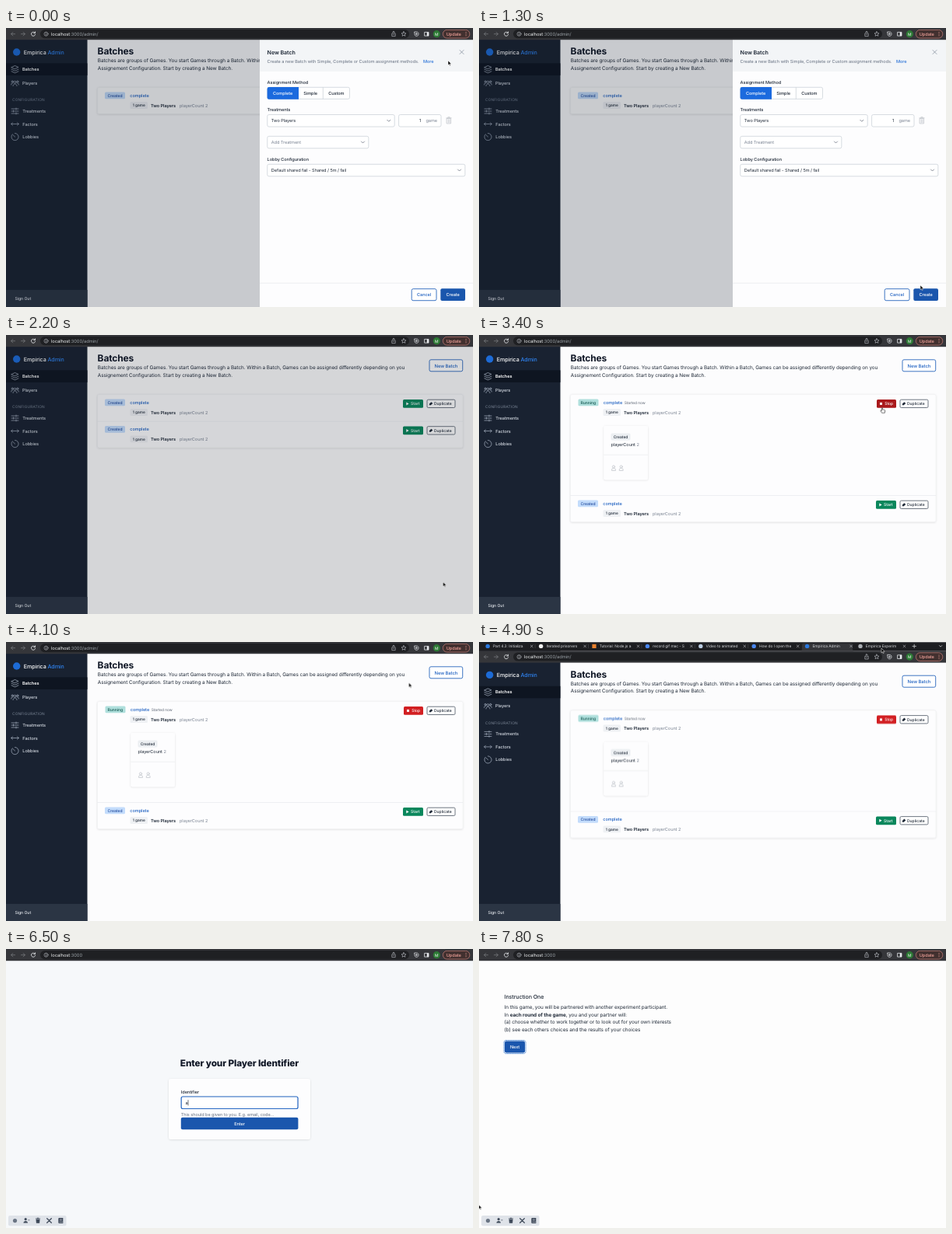
An HTML page that plays this animation: 600 by 359 pixels, repeating every 8 s.

```html
<!DOCTYPE html>
<html lang="en">
<head>
<meta charset="utf-8">
<title>Admin demo</title>
<style>
html, body { margin: 0; width: 100%; height: 100%; overflow: hidden; background: #fcfcfd; }
svg { display: block; width: 600px; height: 359px; }
text {
  font: 400 5.6px Inter, "Liberation Sans", sans-serif;
  letter-spacing: -.012em; text-rendering: geometricPrecision; fill: #1f2937; white-space: pre;
}
.m { font-weight: 500; }
.sb { font-weight: 600; }
.c { text-anchor: middle; }
.p { font-size: 6.4px; }
.p7 { font-size: 7.1px; }
.s { font-size: 5px; font-weight: 500; letter-spacing: 0; }
.tab { font-size: 4.9px; fill: #d5d7da; }
.w { fill: #fff; }
.g { fill: #7c8594; }
.bl { fill: #1c5fc0; }
.line { fill: none; stroke-width: .8; stroke-linecap: round; stroke-linejoin: round; }
.box { fill: #fff; stroke: #cdd3da; stroke-width: .8; }
.solid { fill: #1a56ad; }

/* one 8 s loop: 1.25 % = 100 ms */
.a { animation: 8s step-end infinite; }
.early { animation-name: early; }
.late { animation-name: late; }
.exp { animation-name: exp; }
.ins { animation-name: ins; }
.two { animation-name: two; }
.idle { animation-name: idle; }
.running { animation-name: running; }
.card { animation-name: card; }
.move { animation-name: move; }
.startHover { animation-name: startHover; }
.stopHover { animation-name: stopHover; }
.focus { animation-name: focus; }
.blank { animation-name: blank; }
.typed { animation-name: typed; }
.ring { animation-name: ring; }
.arrow { animation-name: arrow; }
.hand { animation-name: hand; }
.beam { animation-name: beam; }
.shift { animation: shift 8s ease-in-out infinite; }
.panel { animation: panel 8s cubic-bezier(.4,0,.2,1) infinite; }
.dim { animation: dim 8s linear infinite; }
.cursor { animation: cursor 8s ease-in-out infinite; }

@keyframes early { 0% { opacity: 1 } 62.5%, 100% { opacity: 0 } }
@keyframes late { 0% { opacity: 0 } 62.5%, 100% { opacity: 1 } }
@keyframes exp { 0% { opacity: 0 } 62.5% { opacity: 1 } 87.5%, 100% { opacity: 0 } }
@keyframes ins { 0% { opacity: 0 } 87.5%, 100% { opacity: 1 } }
@keyframes two { 0% { opacity: 0 } 21.25%, 100% { opacity: 1 } }
@keyframes idle { 0% { opacity: 1 } 36.875%, 100% { opacity: 0 } }
@keyframes running { 0% { opacity: 0 } 36.875%, 100% { opacity: 1 } }
@keyframes card { 0% { height: 34px } 21.25% { height: 68.5px } 36.875%, 100% { height: 164px } }
@keyframes move { 0% { transform: translateY(34.5px) } 36.875%, 100% { transform: translateY(130px) } }
@keyframes startHover { 0% { fill: #0a875c } 34.5% { fill: #08704c } 36.875%, 100% { fill: #0a875c } }
@keyframes stopHover { 0% { fill: #a9191c } 47.5%, 100% { fill: #d21f22 } }
@keyframes focus { 0% { opacity: 0 } 75%, 100% { opacity: 1 } }
@keyframes blank { 0% { opacity: 0 } 75% { opacity: 1 } 81.25%, 100% { opacity: 0 } }
@keyframes typed { 0% { opacity: 0 } 81.25%, 100% { opacity: 1 } }
@keyframes ring { 0% { opacity: 0 } 91.25%, 100% { opacity: 1 } }
@keyframes arrow {
  0% { opacity: 1 } 18.75% { opacity: 0 } 27.5% { opacity: 1 } 34.5% { opacity: 0 }
  47.5% { opacity: 1 } 75% { opacity: 0 } 91.25%, 100% { opacity: 1 }
}
@keyframes hand { 0% { opacity: 0 } 18.75% { opacity: 1 } 27.5% { opacity: 0 } 34.5% { opacity: 1 } 47.5%, 100% { opacity: 0 } }
@keyframes beam { 0% { opacity: 0 } 75% { opacity: 1 } 81.25%, 100% { opacity: 0 } }
@keyframes shift {
  0%, 53.75% { transform: none } 56.25%, 65.6% { transform: translateY(11.4px) } 68.75%, 100% { transform: none }
}
@keyframes panel { 0%, 20.625% { transform: none } 26.875%, 100% { transform: translateX(274px) } }
@keyframes dim { 0%, 26.875% { opacity: 1 } 29.5%, 100% { opacity: 0 } }
@keyframes cursor {
  0%, 1.25% { transform: translate(568px, 42px) }
  7.5%, 9.5% { transform: translate(571px, 312px) }
  16.25% { transform: translate(567px, 331px) }
  19%, 26.25% { transform: translate(567px, 337px) }
  30%, 31.25% { transform: translate(544px, 256px) }
  33.75% { transform: translate(517px, 102px) }
  36.25%, 46.5% { transform: translate(518px, 93.5px) }
  56.25%, 65.6% { transform: translate(517px, 8px) }
  68.75%, 70.5% { transform: translate(462px, 88px) }
  75.5%, 91.25% { transform: translate(288px, 198px) }
  97%, 100% { transform: translate(-.5px, 329px) }
}
</style>
</head>
<body>
<svg viewBox="0 0 600 359" xmlns="http://www.w3.org/2000/svg">
<defs>
  <filter id="soft" x="-10%" y="-10%" width="120%" height="125%">
    <feDropShadow dx="0" dy=".6" stdDeviation=".8" flood-opacity=".13"/>
  </filter>
  <path id="chev" class="line" d="M-2-1 0 1 2-1" stroke="#6b7280"/>
  <g id="person" class="line" stroke="#c3c7cd">
    <circle cy="-1.5" r="1.6"/><path d="M-2.5 3c0-2 1-2.8 2.5-2.8S2.5 1 2.5 3z"/>
  </g>
  <!-- a batch row: the parts that stay, then the parts shown before it is started -->
  <g id="base">
    <rect x="159.5" y="95" width="22.5" height="9" rx="1.5" fill="#eff1f4"/>
    <text class="s c" x="170.8" y="101.3" style="font-size:4.8px">1 game</text>
    <text class="sb" x="186" y="101.8" font-style="italic" fill="#374151">Two Players</text>
    <text class="g" x="223" y="101.8">playerCount 2</text>
    <rect x="541" y="83.2" width="36" height="10.3" rx="1.5" fill="#fff" stroke="#4b5563" stroke-width=".8"/>
    <path d="M543.9 90.3v-1.8l2.5-2.3 1.9 1.8-2.5 2.3z" fill="#1f2937"/>
    <text class="s" x="550" y="90.2">Duplicate</text>
  </g>
  <g id="fresh">
    <rect x="127" y="82.5" width="26" height="8.8" rx="1.5" fill="#c3dcfb"/>
    <text class="s c" x="140" y="88.7" style="fill:#1e489c">Created</text>
    <text class="m bl" x="159.3" y="88.8">complete</text>
  </g>
  <g id="start">
    <path d="M514.3 86.4v4l3.3-2z" fill="#fff"/>
    <text class="s w" x="520" y="90.2">Start</text>
  </g>
  <g id="tools">
    <rect x="3" y="343" width="74.5" height="13.3" rx="2" fill="#dfe3e9"/>
    <g fill="#3f4a5a">
      <circle cx="11.5" cy="349.6" r="2.6" fill="#6a7584"/>
      <circle cx="25.2" cy="347.7" r="1.6"/><path d="M22.4 352.6c0-3.6 5.6-3.6 5.6 0zM28.4 348.4h2v.8h-2z"/>
      <path d="M38.1 346.4h1.8l.4-.7h1.4l.4.7h1.8v1h-5.8zM38.5 348h5l-.4 4.7h-4.2z"/>
      <path d="M52.7 346.8l5.6 5.4M58.3 346.8l-5.6 5.4" stroke="#3f4a5a" stroke-width="1.3" stroke-linecap="round"/>
      <path d="M67.3 347q0-1 1-1h5v6.9h-5q-1 0-1-1z"/><path d="M68.9 347.8h3M68.9 349.2h3M68.4 351.5h4.6" stroke="#dfe3e9" stroke-width=".5"/>
    </g>
  </g>
</defs>

<!-- admin -->
<g class="a early">
  <rect width="600" height="359" fill="#fcfcfd"/>
  <rect width="104.5" height="359" fill="#192231"/>
  <g class="shift">
    <circle cx="13.7" cy="31" r="4.7" fill="#1d6bd6"/>
    <text class="p7 m w" x="22.8" y="33.6">Empirica <tspan fill="#2f83f0">Admin</tspan></text>
    <rect y="45.4" width="104.5" height="15.5" fill="#0e1521"/>
    <g class="line" stroke="#98a3b3">
      <path d="M7 50.5l4.5-2 4.5 2-4.5 2zM7 53.2l4.5 2 4.5-2M7 55.8l4.5 2 4.5-2"/>
      <circle cx="11.5" cy="69.7" r="1.5"/><circle cx="8.2" cy="69" r="1.1"/><circle cx="14.8" cy="69" r="1.1"/>
      <path d="M9 74.6c0-3.6 5-3.6 5 0M6.7 73c0-2 1-2.3 2-2.1M16.3 73c0-2-1-2.3-2-2.1"/>
      <path d="M7 104h9M7 107h9M7 110h9M13 103v2M9.5 106v2M13 109v2"/>
      <path d="M6.7 123.5h9.6M8.5 121.7l-1.8 1.8 1.8 1.8M14.5 121.7l1.8 1.8-1.8 1.8"/>
      <path d="M11.5 135.4a4.6 4.6 0 1 1-3.3 1.4M11.5 140l-2.5-2.3"/>
    </g>
    <text class="sb w" x="21" y="55.1">Batches</text>
    <g class="navs">
      <text class="m" x="21" y="73.1" style="fill:#d3d9e1">Players</text>
      <text class="m" x="21.3" y="109" style="fill:#d3d9e1">Treatments</text>
      <text class="m" x="21.3" y="125.6" style="fill:#d3d9e1">Factors</text>
      <text class="m" x="21.3" y="141.9" style="fill:#d3d9e1">Lobbies</text>
    </g>
    <text x="8" y="94.2" style="font-size:4.8px;letter-spacing:.035em;fill:#7d8898">CONFIGURATION</text>

    <text x="117.6" y="34.3" style="font-size:12px;font-weight:700;fill:#111827">Batches</text>
    <text class="p" x="117.8" y="44.3">Batches are groups of Games. You start Games through a Batch. Within a Batch, Games can be assigned differently depending on you</text>
    <text class="p" x="117.8" y="53.9">Assignement Configuration. Start by creating a New Batch.</text>
    <rect x="544" y="31.8" width="42.7" height="15" rx="2" fill="#fff" stroke="#2a67bd" stroke-width=".9"/>
    <text class="m bl c" x="565.4" y="41.5" style="font-size:5.9px">New Batch</text>

    <rect class="a card" x="117.5" y="76.5" width="469.5" height="34" rx="2" fill="#fdfdfe" stroke="#eaecef" stroke-width=".5" filter="url(#soft)"/>
    <use href="#base"/>
    <g class="a idle">
      <use href="#fresh"/>
      <rect class="a startHover" x="510" y="83" width="26" height="10.8" rx="1.5" fill="#0a875c"/>
      <use href="#start"/>
    </g>
    <g class="a running">
      <rect x="127.5" y="82.5" width="26" height="8.8" rx="1.5" fill="#afdfdc"/>
      <text class="s c" x="140.4" y="88.7" style="fill:#12564f">Running</text>
      <text class="m bl" x="159.8" y="88.8">complete</text>
      <text x="186.8" y="88.7" style="font-size:4.8px;fill:#5b6473">Started now</text>
      <rect class="a stopHover" x="511" y="83" width="25" height="10.8" rx="1.5"/>
      <rect x="515" y="86.9" width="3" height="3" fill="#fff"/>
      <text class="s w" x="521.2" y="90.2">Stop</text>
      <rect x="160.3" y="117" width="56.7" height="69.3" rx="2" fill="#fdfdfe" filter="url(#soft)"/>
      <path d="M160.3 154.2h56.7" stroke="#e5e7eb" stroke-width=".6"/>
      <rect x="169.5" y="126.4" width="25" height="9" rx="1.5" fill="#eceff2"/>
      <text class="s c" x="182" y="132.7" style="font-size:4.9px">Created</text>
      <text x="169.5" y="142.5">playerCount <tspan fill="#7c8594">2</tspan></text>
      <use href="#person" x="173" y="171"/><use href="#person" x="182.7" y="171"/>
    </g>
    <g class="a two"><g class="a move">
      <path d="M117.5 76.5h469.5" stroke="#e3e6ea" stroke-width=".6"/>
      <use href="#base"/><use href="#fresh"/>
      <rect x="510" y="83" width="26" height="10.8" rx="1.5" fill="#0a875c"/>
      <use href="#start"/>
    </g></g>
  </g>
  <rect y="337" width="104.5" height="22" fill="#2b3544"/>
  <text class="m" x="11.4" y="350.2" style="font-size:5.2px;fill:#e2e6eb">Sign Out</text>

  <rect class="dim" y="15" width="600" height="344" fill="#0d1420" fill-opacity=".215"/>

  <!-- slide-over -->
  <g class="panel">
    <rect x="326" y="15" width="274" height="344" fill="#fdfdfe"/>
    <rect x="326" y="15" width="274" height="41" fill="#f3f5f7"/>
    <text class="p7 sb" x="335.6" y="33.5" fill="#111827">New Batch</text>
    <text x="335.6" y="44.5" style="fill:#667080">Create a new Batch with Simple, Complete or Custom assignment methods.</text>
    <text class="m bl" x="536" y="44.5" style="fill:#2a73d8">More</text>
    <path class="line" d="M583 28.5l5 5M588 28.5l-5 5" stroke="#8a93a1"/>

    <text class="m" x="335.6" y="72.3">Assignment Method</text>
    <rect class="box" x="335.8" y="76.3" width="105.7" height="15" rx="2"/>
    <path d="M376 76h-38q-2.4 0-2.4 2.4v11q0 2.3 2.4 2.3h38z" fill="#1b6ade"/>
    <path d="M407.3 76.3v15" stroke="#cdd3da" stroke-width=".8"/>
    <text class="m w c" x="355.6" y="85.8">Complete</text>
    <text class="m c" x="391.2" y="85.8">Simple</text>
    <text class="m c" x="424.4" y="85.8">Custom</text>

    <text class="m" x="335.6" y="107.4">Treatments</text>
    <rect class="box" x="335.8" y="111.5" width="163.4" height="15.5" rx="2"/>
    <text x="340.8" y="121.3">Two Players</text>
    <use href="#chev" x="491.8" y="119.3"/>
    <rect class="box" x="504.6" y="111.5" width="54.4" height="15.5" rx="2"/>
    <text x="531" y="121.3">1</text>
    <text class="g" x="539.5" y="121.3">game</text>
    <path d="M565.8 115.8h6.4M567.8 115.4v-.7h2.4v.7M566.5 116.5h5v6.4h-5zM568.2 117.8v3.8M569.8 117.8v3.8" class="line" stroke="#c2c6cc"/>

    <rect class="box" x="335.8" y="139.3" width="130" height="15.5" rx="2"/>
    <text class="g" x="340.8" y="149">Add Treatment</text>
    <use href="#chev" x="458.5" y="147"/>

    <text class="m" x="335.6" y="171">Lobby Configuration</text>
    <rect class="box" x="335.8" y="175.3" width="254" height="15.5" rx="2"/>
    <text x="340.8" y="185">Default shared fail - Shared / 5m / fail</text>
    <use href="#chev" x="582.5" y="183"/>

    <path d="M326 328.2h274" stroke="#e5e7eb" stroke-width=".7"/>
    <rect x="521.2" y="335.7" width="31.8" height="15" rx="2" fill="#fff" stroke="#2a67bd" stroke-width=".9"/>
    <text class="m bl c" x="537.1" y="345.2">Cancel</text>
    <rect class="solid" x="558.3" y="335.3" width="31.7" height="15.8" rx="2"/>
    <text class="m w c" x="574.1" y="345.2">Create</text>
  </g>
</g>

<!-- identifier form -->
<g class="a exp">
  <rect width="600" height="359" fill="#f6f8fa"/>
  <g class="shift">
    <text class="c" x="300" y="151" style="font-size:11.8px;font-weight:800;fill:#111827">Enter your Player Identifier</text>
    <rect x="209" y="167" width="182" height="78" rx="3" fill="#fdfdfe" filter="url(#soft)"/>
    <text class="m" x="224.8" y="186">Identifier</text>
    <rect class="box" x="225.2" y="190" width="149.8" height="15.5" rx="2"/>
    <rect class="a focus" x="225.2" y="190" width="149.8" height="15.5" rx="2" fill="#fff" stroke="#2668c4" stroke-width="1.2"/>
    <path class="a blank" d="M230.7 194.2v7.3" stroke="#111827" stroke-width=".6"/>
    <g class="a typed">
      <text x="230.4" y="199.8">a</text>
      <path d="M234 194.2v7.3" stroke="#111827" stroke-width=".6"/>
    </g>
    <text x="224.8" y="214.5" style="fill:#667080">This should be given to you. E.g. email, code...</text>
    <rect class="solid" x="224.8" y="216.8" width="150.6" height="15.4" rx="2"/>
    <text class="m w c" x="300" y="226.5">Enter</text>
  </g>
  <use href="#tools"/>
</g>

<!-- instructions -->
<g class="a ins">
  <rect width="600" height="359" fill="#fdfdfd"/>
  <text class="p7 m" x="32.6" y="63.9" fill="#111827">Instruction One</text>
  <g fill="#111827">
    <text class="p" x="32.6" y="76.8">In this game, you will be partnered with another experiment participant.</text>
    <text class="p" x="32.6" y="86.5">In <tspan font-weight="700">each round of the game</tspan>, you and your partner will:</text>
    <text class="p" x="32.6" y="96.4">(a) choose whether to work together or to look out for your own interests</text>
    <text class="p" x="32.6" y="106.2">(b) see each others choices and the results of your choices</text>
  </g>
  <rect class="solid" x="33" y="118.6" width="26" height="15" rx="2"/>
  <rect class="a ring" x="32" y="117.6" width="28" height="17" rx="2.6" fill="none" stroke="#2f74cf" stroke-width=".9" stroke-dasharray="1.4 .5"/>
  <text class="m w c" x="46" y="128.2">Next</text>
  <use href="#tools"/>
</g>

<!-- browser bar -->
<g class="shift">
  <rect y="-11.4" width="600" height="11.6" fill="#1d1e21"/>
  <path class="a early" d="M413 0q2 0 2-2v-5.5q0-2 2-2h61q2 0 2 2V-2q0 2 2 2z" fill="#35363a"/>
  <path class="a late" d="M481.5 0q2 0 2-2v-5.5q0-2 2-2h62q2 0 2 2V-2q0 2 2 2z" fill="#35363a"/>
  <g id="tabs"></g>
  <path class="line" d="M557-6h4.4M559.2-8.2v4.4M591.5-6.8l1.6 1.6 1.6-1.6" stroke="#d0d2d5"/>

  <rect width="600" height="15.2" fill="#35363a"/>
  <rect x="44" y="2" width="474" height="11.2" rx="5.6" fill="#1f2023"/>
  <path class="line" d="M11.5 7.7H6.7M8.8 5.5 6.6 7.7l2.2 2.2M19.5 7.7h4.8M22.2 5.5l2.2 2.2-2.2 2.2" stroke="#77797d"/>
  <path class="line" d="M37.2 6.2a2.6 2.6 0 1 0 .4 2.2M37.5 4.8v1.8h-1.8" stroke="#e8eaed"/>
  <g class="line" stroke="#b9bcc1" style="stroke-width:.65">
    <circle cx="51.5" cy="7.7" r="2.5"/><path d="M51.5 7.4v1.6M51.5 6.1v.1"/>
    <path d="M496.6 7h-.8v3.6h4.4V7h-.8M498 8.6V4.3M496.6 5.6 498 4.2l1.4 1.4"/>
    <path d="M511 4.6l.9 2 2.1.2-1.6 1.4.5 2.1-1.9-1.1-1.9 1.1.5-2.1L508 6.8l2.1-.2z"/>
  </g>
  <text x="58" y="9.8" style="font-size:5.8px;fill:#f1f3f4" class="a early">localhost<tspan fill="#9aa0a6">:3000/admin/</tspan></text>
  <text x="58" y="9.8" style="font-size:5.8px;fill:#f1f3f4" class="a late">localhost<tspan fill="#9aa0a6">:3000</tspan></text>
  <path class="line" d="M525 5h2.2c2 0 2.8 1 2.8 2.7S529 10.4 527.4 10.4 525 9.4 525 7.8zM527.4 6.5v2.4M526.2 7.7h2.4" stroke="#dadce0"/>
  <path d="M538 5.4h5v4.7h-5z" class="line" stroke="#e8eaed"/><path d="M540.8 5.4h2.2v4.7h-2.2z" fill="#e8eaed"/>
  <circle cx="553.3" cy="7.7" r="4.6" fill="#2d7a35"/>
  <text class="c w" x="553.3" y="9.5" style="font-size:5px">M</text>
  <rect x="561.3" y="2.4" width="34.5" height="10.7" rx="5.3" fill="#42302f" stroke="#e48d85" stroke-width=".6"/>
  <text class="m" x="565.8" y="9.8" style="fill:#f0a29a">Update</text>
  <g fill="#f0a29a"><circle cx="591" cy="5.6" r=".55"/><circle cx="591" cy="7.7" r=".55"/><circle cx="591" cy="9.8" r=".55"/></g>
</g>

<!-- pointer -->
<g class="cursor">
  <path class="a arrow" d="M0 0v5.8l1.3-1.2.9 2 1-.4-.9-2h1.9z" fill="#000" stroke="#fff" stroke-width=".5"/>
  <path class="a hand" d="M-.6.4q.6-.8 1.1 0v2l2.7.6q.7.3.6 1.1l-.6 2.7h-3.4l-2-2.6q0-.9.9-.7l.7.5z" fill="#fff" stroke="#111" stroke-width=".6"/>
  <path class="a beam" d="M-1.2-3.8Q0-3.8 0-3V3Q0 3.8 1.2 3.8M1.2-3.8Q0-3.8 0-3M0 3Q0 3.8-1.2 3.8" fill="none" stroke="#222" stroke-width=".6"/>
</g>
</svg>
<script>
const tabs = [
  ["Part 4.3: Initializa", "#2a78dc"], ["Iterated prisoners", "#f0f0f0"],
  ["Tutorial: Node.js a", "#e8812e"], ["record gif mac - S", "#4a87ee"],
  ["Video to animated", "#b9cbe0"], ["How do I open the", "#4a87ee"],
  ["Empirica Admin", "#2a78dc"], ["Empirica Experim", "#a9adb3"]
];
const pitch = 68.4;
document.getElementById("tabs").innerHTML = tabs.map(([label, color], i) => {
  const x = 11.2 + i * pitch, end = x + 56.5;
  const icon = i === 2
    ? `<rect x="${x - 2.6}" y="-8.6" width="5.2" height="5.2" fill="${color}"/>`
    : `<circle cx="${x}" cy="-6" r="2.7" fill="${color}"/>`;
  const rule = i < 5 ? `<path d="M${end + 4.4}-8.6v5.2" stroke="#55575b" stroke-width=".5"/>` : "";
  return `${icon}<text class="tab" x="${x + 6.8}" y="-4.4">${label}</text>
    <path class="line" d="M${end - 1.4}-7.4l2.8 2.8m0-2.8l-2.8 2.8" stroke="#c4c7cb" style="stroke-width:.6"/>${rule}`;
}).join("");
</script>
</body>
</html>
```
